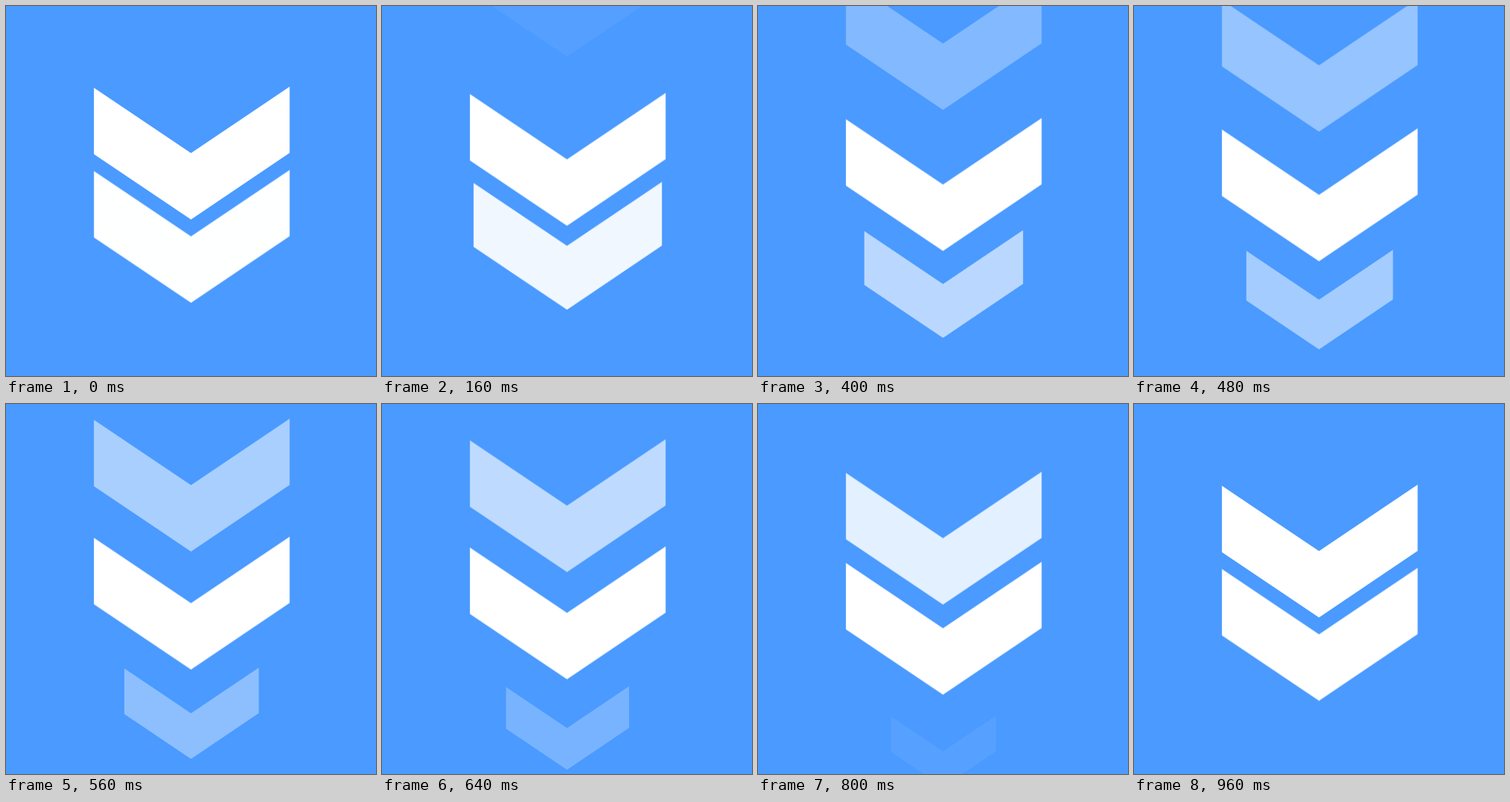
Animation of 500 by 500 pixels, one loop 1000 ms. Source, as an HTML page without scripts:

```html
<!DOCTYPE html>
<html lang="en">
<head>
<meta charset="utf-8">
<title>Falling chevrons</title>
<style>
  html, body {
    margin: 0;
    width: 100%;
    height: 100%;
    overflow: hidden;
    background: #4a9aff;
  }
  svg {
    display: block;
    width: 100%;
    height: 100%;
  }
  .chevron {
    --ease: cubic-bezier(.333, 0, .667, 1);
    --ease-fade: cubic-bezier(.333, 0, .667, .78);
    fill: #fff;
    transform-origin: 250px 199.35px;
    animation: 1s var(--ease) infinite;
  }
  .enter {
    animation-name: drop, appear;
    animation-timing-function: var(--ease), var(--ease-fade);
  }
  .shift { animation-name: shift; }
  .leave { animation-name: leave; }

  /* Each move ends at 96% and rests until the loop restarts. */
  @keyframes drop {
    0% { transform: translateY(-238px); }
    96%, 100% { transform: none; }
  }
  @keyframes appear {
    0% { opacity: 0; }
    96%, 100% { opacity: 1; }
  }
  @keyframes shift {
    0% { transform: none; }
    96%, 100% { transform: translateY(112.5px); }
  }
  @keyframes leave {
    0% { transform: translateY(112.5px) scale(1); opacity: 1; }
    96%, 100% { transform: translateY(282.8px) scale(.5); opacity: 0; }
  }
</style>
</head>
<body>
<svg viewBox="0 0 500 500">
  <defs>
    <path id="chevron" d="M118.8 110.4 250 198.7 383.3 108.9V198.4L250 288.5 118.8 200.3Z"/>
  </defs>
  <use class="chevron leave" href="#chevron"/>
  <use class="chevron enter" href="#chevron"/>
  <use class="chevron shift" href="#chevron"/>
</svg>
</body>
</html>
```
